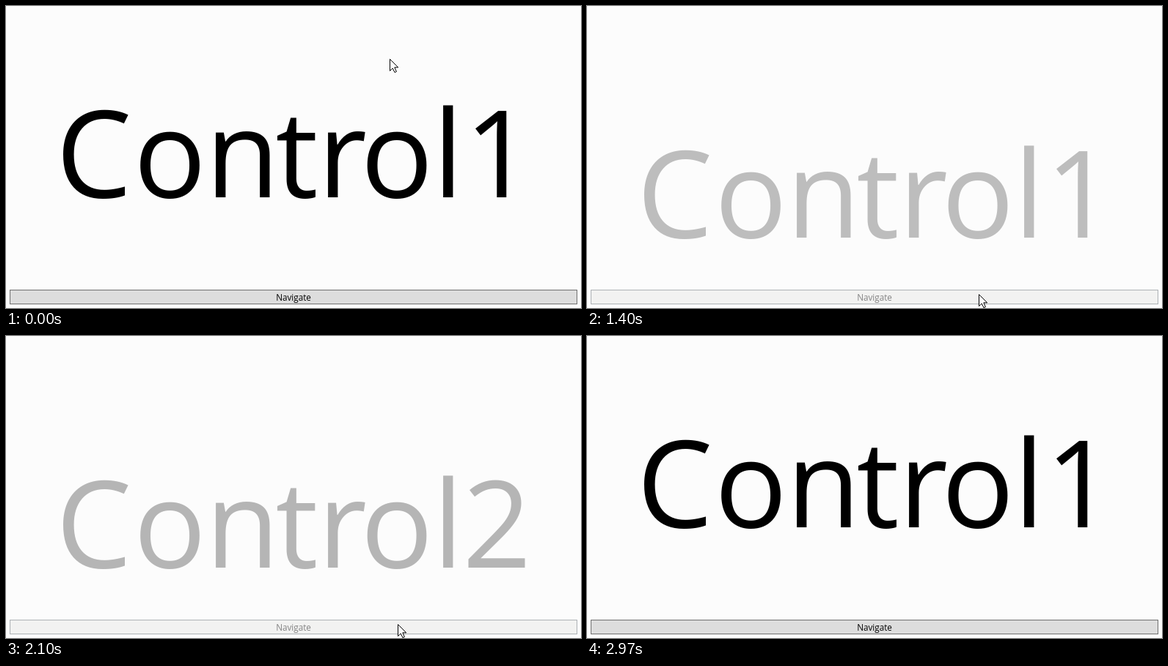
An HTML page for the animation above (3.31 s loop, 784 px wide and 412 px high).

```html
<!DOCTYPE html>
<html lang="en">
<head>
<meta charset="utf-8">
<title>Navigation transition</title>
<style>
  html, body { margin: 0; width: 100%; height: 100%; overflow: hidden; background: #fcfcfc; }
  svg { display: block; }
  text { font-family: "Open Sans", "Noto Sans", sans-serif; }
  #page { font-size: 164px; }
  #label { font-size: 11.7px; text-anchor: middle; }
</style>
</head>
<body>
<svg width="784" height="412" viewBox="0 0 784 412">
  <rect width="784" height="412" fill="#fcfcfc"/>
  <g id="page">
    <text id="word" y="261" x="68 174 272 367.5 425 483.5 582">Control</text>
    <text id="digit" y="261"></text>
  </g>
  <rect id="button" x="5.5" y="387.5" width="773" height="19"/>
  <text id="label" x="392" y="402">Navigate</text>
  <path id="cursor" d="M.5 .5V16.5L4.2 12.9 7 18.6 9.4 17.5 6.8 11.8H11.7Z" fill="#fff" stroke="#000"/>
</svg>
<script>
const LOOP = 3310;
const SLIDE = 56;
const $ = id => document.getElementById(id);
const clamp = v => Math.min(1, Math.max(0, v));
const easeOut = s => 1 - (1 - s) ** 3;

const digitX = { 1: 625, 2: 622.5 };

// Each navigation slides one page out downwards, then the next in from above.
const navigations = [
  { start: 1238, half: 217, from: 1, to: 2 },
  { start: 1876, half: 312, from: 2, to: 1 }
];

const looks = {
  normal:   { fill: '#dddddd', stroke: '#707070', text: '#000' },
  hover:    { fill: '#bee6fd', stroke: '#3c7fb1', text: '#000' },
  pressed:  { fill: '#c4e5f6', stroke: '#2c628b', text: '#000' },
  disabled: { fill: '#f2f2f1', stroke: '#adb2b5', text: '#838383' }
};

// time, x, y of the pointer tip
const pointerPath = [
  [0, 523, 72], [30, 523, 76], [500, 531, 386], [580, 534, 414],
  [760, 536, 414], [960, 534, 393], [2115, 534, 393],
  [2330, 729, 351], [2500, 750, 414], [LOOP, 750, 414]
];

function pageAt(t) {
  let digit = 1;
  for (const { start, half, from, to } of navigations) {
    if (t < start) break;
    const out = clamp((t - start) / half);
    if (out < 1) return { digit: from, y: SLIDE * easeOut(out), opacity: 1 - out };
    const entry = clamp((t - start - half) / half);
    if (entry < 1) return { digit: to, y: SLIDE * (easeOut(entry) - 1), opacity: entry };
    digit = to;
  }
  return { digit, y: 0, opacity: 1 };
}

function pointerAt(t) {
  const i = pointerPath.findIndex(p => p[0] > t);
  const [t0, x0, y0] = pointerPath[i - 1];
  const [t1, x1, y1] = pointerPath[i];
  const s = (t - t0) / (t1 - t0);
  const k = s * s * (3 - 2 * s);
  return [Math.round(x0 + (x1 - x0) * k), Math.round(y0 + (y1 - y0) * k)];
}

function lookAt(t) {
  if (navigations.some(n => t >= n.start && t < n.start + 2 * n.half)) return looks.disabled;
  if (navigations.some(n => t >= n.start - 80 && t < n.start)) return looks.pressed;
  return t >= 500 && t < 2130 ? looks.hover : looks.normal;
}

function draw(t) {
  const page = pageAt(t);
  $('page').setAttribute('transform', `translate(0 ${Math.round(page.y)})`);
  $('page').setAttribute('opacity', page.opacity.toFixed(3));
  $('digit').textContent = page.digit;
  $('digit').setAttribute('x', digitX[page.digit]);

  const look = lookAt(t);
  $('button').setAttribute('fill', look.fill);
  $('button').setAttribute('stroke', look.stroke);
  $('label').setAttribute('fill', look.text);

  $('cursor').setAttribute('transform', `translate(${pointerAt(t).join(' ')})`);
}

const began = performance.now();
function tick() {
  draw((performance.now() - began) % LOOP);
  requestAnimationFrame(tick);
}
tick();
</script>
</body>
</html>
```
